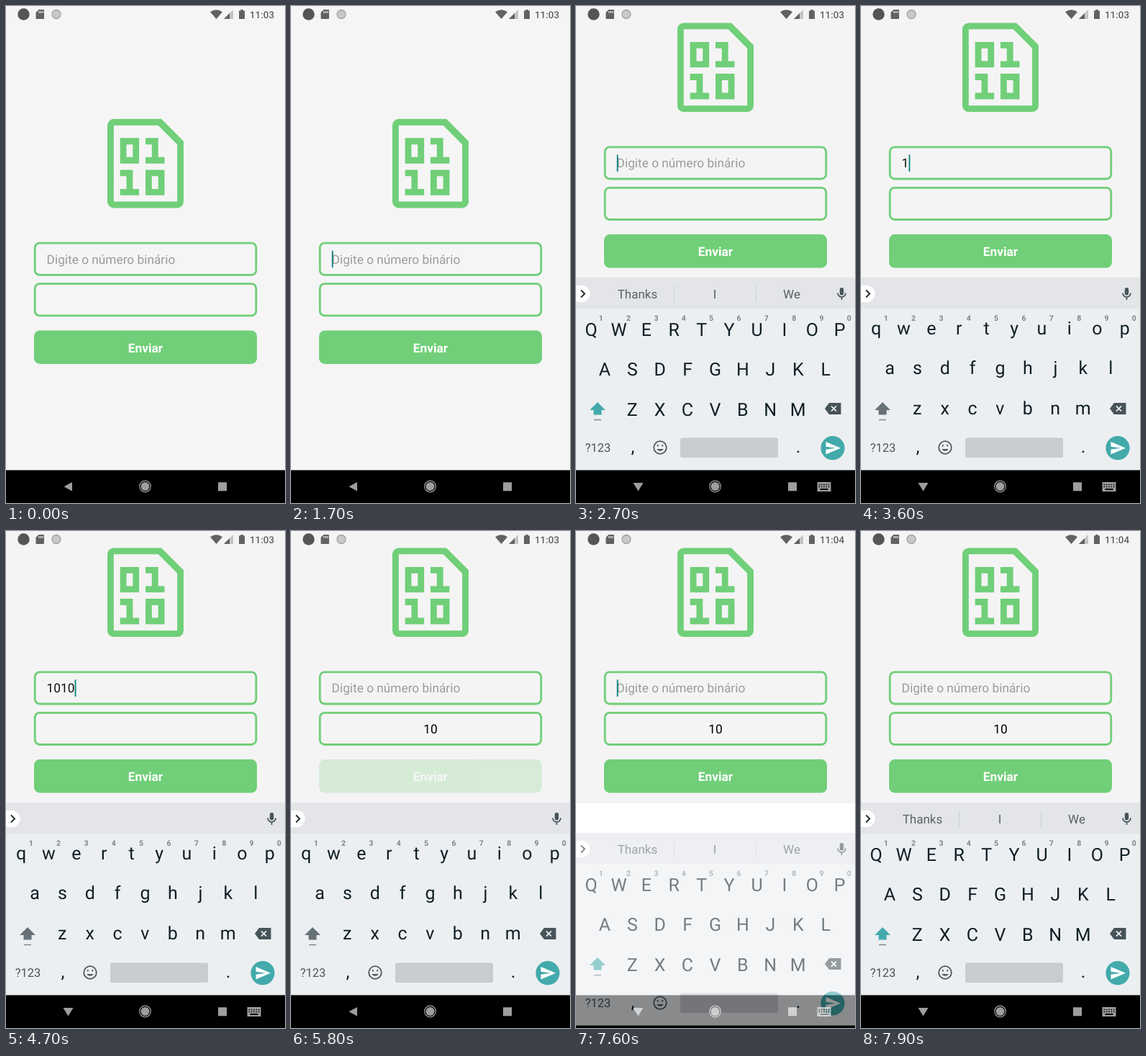
These frames come from a looping animation (388x690 px, 8 s). An HTML page:

```html
<!DOCTYPE html>
<html lang="pt">
<head>
<meta charset="utf-8">
<style>
  html, body { margin: 0; height: 100%; overflow: hidden; background: #fff; }
  svg { display: block; width: 100%; height: 100%; font-family: Roboto, sans-serif; text-rendering: geometricPrecision; }
  .mid { text-anchor: middle; }
  .key { font-size: 25px; fill: #101f26; }
  .hint { font-size: 10.5px; font-weight: 700; fill: #7d8589; }
  .word { font-size: 17px; fill: #596267; }
  .line { fill: none; stroke: #70cf78; stroke-width: 2.8; }
  #form { font-size: 17.3px; }
</style>
</head>
<body>
<svg viewBox="0 0 388 690">
  <rect id="page" width="388"/>

  <g id="form">
    <path transform="translate(141 148) scale(8.83)" fill="#70cf78" fill-rule="evenodd"
      d="M1 1H8.5L12 4.5V14a1 1 0 0 1-1 1H1a1 1 0 0 1-1-1V2a1 1 0 0 1 1-1zM1 2V14H11V5L8 2z
         M2 4H5V8H2zM3 5V7H4V5z M6 4H8V7H9V8H6V7H7V5H6z
         M2 9H4V12H5V13H2V12H3V10H2z M6 9H9V13H6zM7 10V12H8V10z"/>
    <rect class="line" x="40.2" y="329.2" width="307.6" height="44.2" rx="6.5"/>
    <rect class="line" x="40.2" y="385.7" width="307.6" height="44.2" rx="6.5"/>
    <text id="input" x="56.6" y="357.8"></text>
    <rect id="cursor" y="339.8" width="1.8" height="23.5" fill="#0b7f7c"/>
    <text id="result" class="mid" x="194" y="414.3">10</text>
    <g id="send">
      <rect x="39" y="450.5" width="310" height="46.4" rx="8" fill="#70cf78"/>
      <text class="mid" x="194" y="480.5" font-weight="700" fill="#fff">Enviar</text>
    </g>
  </g>

  <g id="status" fill="#616161">
    <circle cx="24.5" cy="11.5" r="8.2" fill="#555"/>
    <path d="M45.5 5H52a1 1 0 0 1 1 1V17a1 1 0 0 1-1 1H42.5a1 1 0 0 1-1-1V9z"/>
    <path d="M46 7v3M48.5 7v3M51 7v3" stroke="#f5f5f5" stroke-width="1.2"/>
    <circle cx="70" cy="11.5" r="6" fill="#c9c9c9" stroke="#a2a2a2" stroke-width="1.3"/>
    <path d="M284 8.3Q292.5 2 301 8.3L292.5 18z"/>
    <path d="M303 18L316 5V18z" fill="#c4c4c4"/>
    <path d="M303 18L311 10V18z"/>
    <path d="M324 6.5H326.3V5H329.7V6.5H332V18H324z"/>
    <text id="clock" x="339" y="16.7" font-size="13.4" font-weight="500"></text>
  </g>

  <rect y="644.4" width="388" height="46"/>

  <g id="board">
    <rect y="377" width="388" height="268" fill="#eceff2"/>
    <rect y="377" width="388" height="43" fill="#e3e5e9"/>
    <rect y="644.4" width="388" height="120"/>
    <path d="M0 388H8a11.5 11.5 0 0 1 0 23H0z" fill="#fff"/>
    <path d="M7 394.5l5 5-5 5" fill="none" stroke="#20292d" stroke-width="1.9"/>
    <g id="words" class="word mid">
      <path d="M136.5 388v23M250.5 388v23" stroke="#cbd0d3"/>
      <text x="85.5" y="405.5">Thanks</text>
      <text x="193" y="405.5">I</text>
      <text x="300" y="405.5">We</text>
    </g>
    <rect x="366.8" y="391" width="5.4" height="10.5" rx="2.7" fill="#47545a"/>
    <path d="M364 398.5a5.5 5.5 0 0 0 11 0M369.5 404v4" fill="none" stroke="#47545a" stroke-width="1.7"/>
    <g id="keys" class="mid"></g>
    <path id="shift" d="M30 550L41 561H35.5V567.5H24.5V561H19z"/>
    <path d="M25 574.5h10" stroke="#7d878b" stroke-width="1.5"/>
    <path d="M352 551H368.5V567H352L346 559z" fill="#47545a"/>
    <path d="M355 555.5l7 7m0-7l-7 7" stroke="#fff" stroke-width="1.7"/>
    <text class="mid" x="30.5" y="619.3" font-size="16.5" fill="#4a5459">?123</text>
    <text class="key mid" x="79" y="620">,</text>
    <text class="key mid" x="309" y="620">.</text>
    <g fill="none" stroke="#4d595f" stroke-width="1.8">
      <circle cx="117" cy="613" r="8.8"/>
      <path d="M112.5 615a4.8 4.2 0 0 0 9 0z" fill="#4d595f" stroke="none"/>
      <path d="M113.8 609v2.5M120.2 609v2.5"/>
    </g>
    <rect x="145" y="599.5" width="136" height="27.5" rx="2.5" fill="#c8ccd1"/>
    <circle cx="357" cy="613.7" r="16.6" fill="#43aaab"/>
    <path d="M347.5 605L368 613.7L347.5 622.5V615.7L361 613.7L347.5 611.7z" fill="#fff"/>
  </g>

  <g fill="#fff" opacity=".62">
    <path id="back"/>
    <circle cx="193.5" cy="667" r="6"/>
    <circle cx="193.5" cy="667" r="7.8" fill="none" stroke="#fff" stroke-width="1.2"/>
    <rect x="295" y="661.3" width="12" height="12"/>
    <g id="picker">
      <path fill-rule="evenodd" d="M335.5 661H354.5V674H335.5zM339.5 670V672H350.5V670z"/>
      <path d="M337.5 664.5h15M337.5 667.5h15" stroke="#000" stroke-width="1.5" stroke-dasharray="1.7 1.6"/>
    </g>
  </g>
</svg>
<script>
const $ = id => document.getElementById(id);
const set = (id, attrs) => {
  for (const name in attrs) $(id).setAttribute(name, attrs[name]);
};
const show = (id, on) => set(id, { visibility: on ? 'visible' : 'hidden' });
const within = (t, spans) => spans.some(([a, b]) => t >= a && t < b);

const LOOP = 8000, STEP = 100, PITCH = 38.4, DIGIT = 9.71;
const ROWS = [['QWERTYUIOP', 21.1, 458], ['ASDFGHJKL', 40, 512.9], ['ZXCVBNM', 78.2, 569]];
const CURSOR = [[1700, 2200], [2700, 3200], [3500, 4000], [4400, 5300], [7400, 7900]];
const TYPED = [3500, 4400, 4600, 4700];

function keys(lower) {
  const label = (cls, x, y, s) => `<text class="${cls}" x="${x}" y="${y}">${s}</text>`;
  return ROWS.map(([letters, x, y]) => [...letters].map((c, i) =>
    label('key', x + i * PITCH, lower ? y - 2 : y, lower ? c.toLowerCase() : c)).join('')).join('') +
    [...'1234567890'].map((c, i) => label('hint', 34.7 + i * 38.35, 437, c)).join('');
}
const layouts = [keys(false), keys(true)];
let shown = -1;

// Keyboard offset and opacity: eased entry, short exit
function boardPose(t) {
  if (t >= 5900 && t < 6000) return [40, .35];
  const start = t < 6000 ? 1800 : 7500;
  const rest = 1 - Math.max(0, Math.min(1, (t - start) / 400));
  return [63 * rest ** 1.4, 1 - rest ** 3];
}

function draw(now) {
  const t = Math.floor(now % LOOP / STEP) * STEP;
  const open = within(t, [[1800, 5900], [7500, LOOP]]);
  const lower = +within(t, [[3500, 6000]]);
  const sent = t >= 5800;
  const typed = sent ? 0 : TYPED.filter(at => t >= at).length;

  set('page', { height: open ? 378 : 645, fill: open ? '#f4f4f4' : t >= 6000 ? '#f7f7f7' : '#f5f5f5' });
  set('form', { transform: `translate(0 ${open ? -133.4 : 0})` });
  $('input').textContent = typed ? '1010'.slice(0, typed) : 'Digite o número binário';
  set('input', { fill: typed ? '#111' : '#9c9c9c' });
  set('cursor', { x: 56.8 + typed * DIGIT });
  show('cursor', within(t, CURSOR));
  show('result', sent);
  set('send', { opacity: { 5700: .6, 5800: .23, 5900: .6 }[t] ?? 1 });
  $('clock').textContent = t < 6600 ? '11:03' : '11:04';

  const [y, alpha] = boardPose(t);
  set('board', { transform: `translate(0 ${y})`, opacity: alpha });
  if (shown !== lower) $('keys').innerHTML = layouts[shown = lower];
  set('words', { opacity: 1 - lower });
  set('shift', { fill: lower ? '#667278' : '#43aaab' });

  const down = open && t !== 5800;
  set('back', { d: down ? 'M79.5 662H93.5L86.5 673.5z' : 'M92 661V673.5L80.5 667.2z' });
  show('picker', down);
  requestAnimationFrame(() => draw(performance.now() - begin));
}
const begin = performance.now();
draw(0);
</script>
</body>
</html>
```
